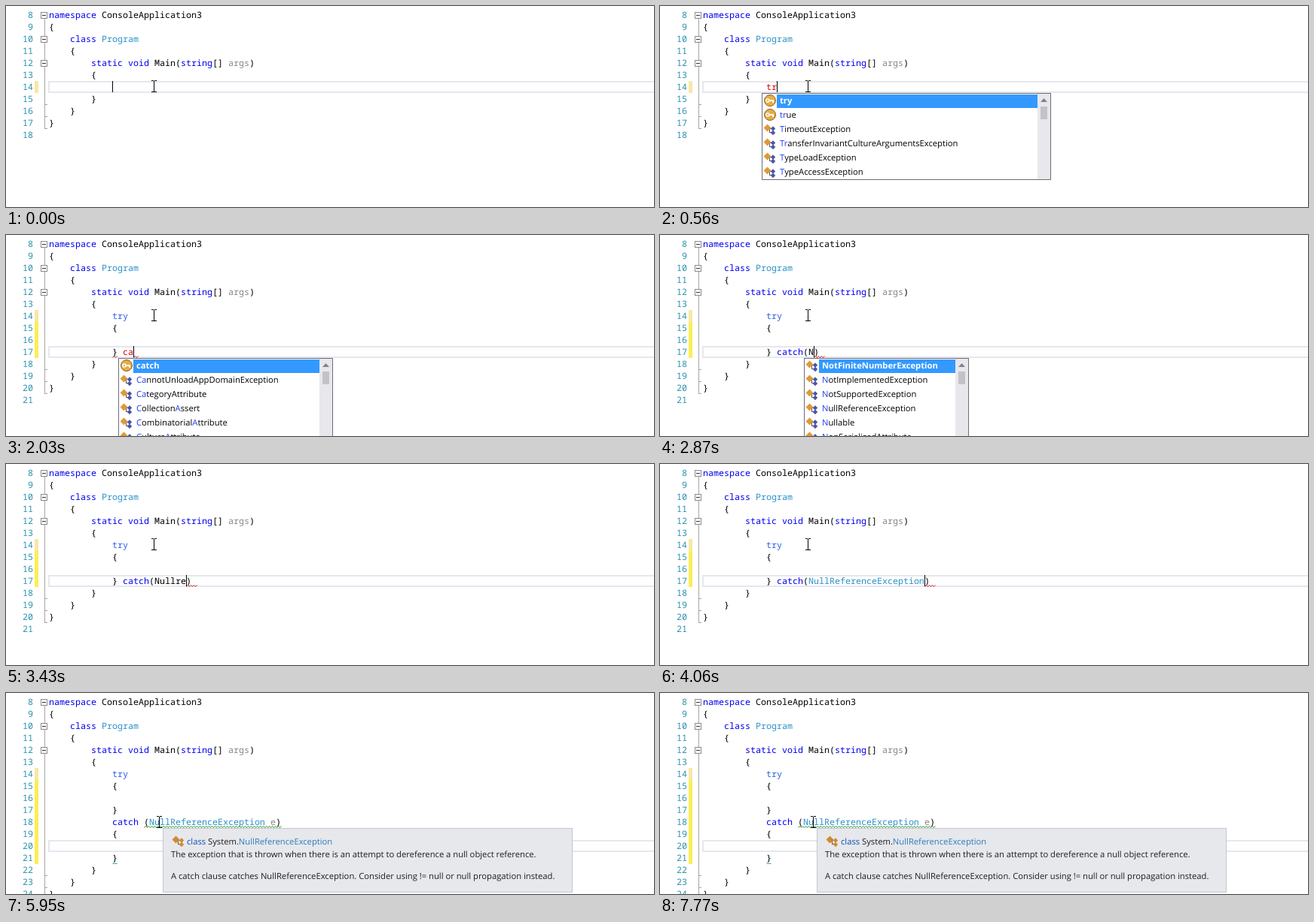
Animation of 860x268 px, one loop 8000 ms. Source, as an HTML page with a canvas:

```html
<!DOCTYPE html>
<html lang="en">
<head>
<meta charset="utf-8">
<title>Code editor</title>
<style>
  html, body { margin: 0; width: 100%; height: 100%; overflow: hidden; background: #fff; }
  canvas { display: block; }
</style>
</head>
<body>
<canvas id="stage" width="860" height="268"></canvas>
<script>
const ctx = document.getElementById('stage').getContext('2d');
const LOOP = 8000, LEFT = 57, CHAR = 7;
const CODE_FONT = '11.667px "Noto Sans Mono", monospace';
const UI_FONT = '11.23px "Open Sans", sans-serif';
const RED = '#d01818', GREEN = '#1f8a1f', TEAL = '#2b91af';

const wordColors = {};
const paintWords = (color, words) => words.split(' ').forEach(w => wordColors[w] = color);
paintWords('#0000f0', 'namespace class static void string catch');
paintWords('#2a5ee4', 'try');
paintWords('#2b91c8', 'Program NullReferenceException');
paintWords('#868686', 'args e');
paintWords('#e00000', 't tr c ca cat');

const head = [
  'namespace ConsoleApplication3', '{', '    class Program', '    {',
  '        static void Main(string[] args)', '        {'
];
const tail = ['        }', '    }', '}', ''];

const tryBlock = last => ['try', '{', '', last];
const fullBlock = [...tryBlock('}'), 'catch (NullReferenceException e)', '{', '', '}'];

const tryList = { col: 12, row: 6, width: 384, count: 6, items: [
  'try', 'true', 'TimeoutException', 'TransferInvariantCultureArgumentsException',
  'TypeLoadException', 'TypeAccessException'] };
const catchList = { col: 14, row: 9, width: 285, count: 9, items: [
  'catch', 'CannotUnloadAppDomainException', 'CategoryAttribute', 'CollectionAssert',
  'CombinatorialAttribute', 'CultureAttribute'] };
const nameList = { col: 20, row: 9, width: 219, count: 9, items: [
  'NotFiniteNumberException', 'NotImplementedException', 'NotSupportedException',
  'NullReferenceException', 'Nullable', 'NonSerializedAttribute'] };
const nullList = { ...nameList, width: 304, items: [
  'NullReferenceException', 'Nullable', 'NUnitSettings', 'NotSupportedException',
  'NonUniqueArgumentException', 'NumericAttribute'] };
const singleList = { ...nameList, width: 259, count: 1, items: ['NullReferenceException'] };

// marks: [first column, last column, row, color, straight]
const typeTry = text => ({ body: [text], col: 12 + text.length, on: 1 });
const typeCatch = (text, marks = [[12, 13, 9, RED], [12 + text.length, 13 + text.length, 9, RED]]) =>
  ({ body: tryBlock(text), col: 12 + text.length, on: 1, braces: 0, marks });
const typeName = name => ({
  body: tryBlock(`} catch(${name})`), col: 20 + name.length, on: 1,
  marks: [[20 + name.length, 22 + name.length, 9, RED]]
});

const steps = [
  [0, { body: [''], row: 6, col: 12, on: 1, marks: [], popup: null, braces: 0, tip: 0, mouse: [196, 107] }],
  [140, { on: 0 }],
  [350, typeTry('t')],
  [420, { popup: tryList }],
  [490, typeTry('tr')],
  [630, typeTry('try')],
  [700, { popup: null }],
  [840, { body: ['try { }'], col: 18, marks: [[18, 19, 6, '#b4aca4']] }],
  [1120, { on: 0 }],
  [1260, { body: tryBlock('}'), row: 8, col: 16, on: 1, marks: [] }],
  [1540, { row: 9, col: 13 }],
  [1610, { braces: 1 }],
  [1680, { body: tryBlock('} '), col: 14 }],
  [1820, typeCatch('} c')],
  [1890, { popup: catchList }],
  [1960, typeCatch('} ca')],
  [2240, typeCatch('} cat')],
  [2310, { ...typeCatch('} catch', []), popup: null }],
  [2380, typeName('')],
  [2520, { on: 0 }],
  [2730, typeName('N')],
  [2800, { popup: nameList }],
  [3010, { ...typeName('Nu'), popup: nullList }],
  [3080, typeName('Nul')],
  [3220, typeName('Null')],
  [3360, typeName('Nullr')],
  [3430, { ...typeName('Nullre'), popup: null }],
  [3500, typeName('Nullref')],
  [3570, { popup: singleList }],
  [3710, typeName('Nullrefe')],
  [3780, typeName('Nullrefer')],
  [3850, typeName('Nullrefere')],
  [3990, { ...typeName('NullReferenceException'), popup: null }],
  [4690, typeName('NullReferenceException ')],
  [4760, typeName('NullReferenceException e')],
  [4900, { body: tryBlock('} catch(NullReferenceException e) { }'), col: 48, marks: [] }],
  [4970, { body: fullBlock, row: 12, col: 16,
           marks: [[18, 44, 10, GREEN], [12, 13, 13, TEAL, true]] }],
  [5460, { mouse: [199, 134] }],
  [5530, { mouse: [201, 162] }],
  [5670, { mouse: [202, 168] }],
  [5740, { mouse: [203, 172] }],
  [5880, { on: 0, tip: 0.5 }],
  [5950, { tip: 1 }],
  [6370, { on: 1 }],
  [6860, { on: 0 }],
  [7350, { on: 1 }],
  [7770, { on: 0 }]
];

const colX = col => LEFT + CHAR * col;
const rowY = row => 12 + 16 * row;
const stateAt = time => Object.assign({}, ...steps.filter(s => s[0] <= time).map(s => s[1]));

function rect(x, y, w, h, color) {
  ctx.fillStyle = color;
  ctx.fillRect(x, y, w, h);
}

function frame(x, y, w, h, fill, border) {
  rect(x, y, w, h, border);
  rect(x + 1, y + 1, w - 2, h - 2, fill);
}

function polygon(points, color) {
  ctx.beginPath();
  points.forEach(p => ctx.lineTo(...p));
  ctx.fillStyle = color;
  ctx.fill();
}

const diamond = (x, y, r, color) =>
  polygon([[x, y - r], [x + r, y], [x, y + r], [x - r, y]], color);

// Draws [text, color] runs one after another.
function runs(x, y, parts, font = UI_FONT) {
  ctx.font = font;
  for (const [text, color] of parts) {
    ctx.fillStyle = color;
    ctx.fillText(text, x, y);
    x += ctx.measureText(text).width;
  }
}

function codeLine(text, row) {
  ctx.font = CODE_FONT;
  for (const token of text.matchAll(/\w+|[^\w\s]/g)) {
    ctx.fillStyle = wordColors[token[0]] || '#000';
    ctx.fillText(token[0], colX(token.index), rowY(row) + 4);
  }
}

function squiggle([from, to, row, color, straight]) {
  const y = rowY(row) + 6.5, end = colX(to) + 1;
  ctx.beginPath();
  for (let x = colX(from) + 0.5, i = 0; x <= end; x += 2, i++) {
    ctx.lineTo(x, straight ? y + 1 : y + (i % 2 ? -1 : 1));
  }
  ctx.strokeStyle = color;
  ctx.lineWidth = 1;
  ctx.stroke();
}

function gutter(lines, bodyLength) {
  rect(38, 100, 5, 16, '#f7e8a6');
  rect(38, 116, 5, 16 * (bodyLength - 1), '#fbee58');
  const firstEnd = head.length + bodyLength;
  rect(51, 17, 1, rowY(firstEnd + 2) + 7 - 17, '#a5a5a5');
  for (let i = 0; i < 3; i++) rect(51, rowY(firstEnd + i) + 7, 4, 1, '#a5a5a5');
  for (const row of [0, 2, 4]) {
    frame(46, rowY(row) - 4, 9, 9, '#fff', '#8a8a8a');
    rect(48, rowY(row), 5, 1, '#333');
  }
  ctx.font = CODE_FONT;
  ctx.fillStyle = TEAL;
  ctx.textAlign = 'right';
  lines.forEach((_, i) => ctx.fillText(i + 8, 36, rowY(i) + 4));
  ctx.textAlign = 'left';
}

function classIcon(x, y, main, small) {
  rect(x + 5, y + 5, 6, 1, '#555');
  rect(x + 7, y + 5, 1, 6, '#555');
  rect(x + 7, y + 10, 4, 1, '#555');
  diamond(x + 4.5, y + 4.5, 5, main);
  diamond(x + 12, y + 5.5, 3.2, small);
  diamond(x + 12, y + 11, 3.2, small);
}

function keyIcon(x, y) {
  ctx.beginPath();
  ctx.arc(x, y, 7.5, 0, 7);
  ctx.fillStyle = '#e5ad45';
  ctx.fill();
  ctx.strokeStyle = '#8d6420';
  ctx.lineWidth = 1;
  ctx.stroke();
  ctx.beginPath();
  ctx.arc(x - 3, y, 2, 0, 7);
  ctx.strokeStyle = '#fff';
  ctx.lineWidth = 1.6;
  ctx.stroke();
  rect(x - 1, y - 1, 6, 2, '#fff');
  rect(x + 3, y, 2, 3, '#fff');
}

function matchRuns(text, query) {
  const blue = '#1c3cf0', black = '#000', n = query.length;
  if (text.toLowerCase().startsWith(query)) return [[text.slice(0, n), blue], [text.slice(n), black]];
  const hump = n > 1 ? text.indexOf(query[1].toUpperCase(), 1) : -1;
  if (hump < 0) return [[text[0], blue], [text.slice(1), black]];
  return [[text[0], blue], [text.slice(1, hump), black], [text[hump], blue], [text.slice(hump + 1), black]];
}

function drawPopup({ col, row, width, count, items }, query) {
  const x = colX(col) - 6, y = rowY(row) + 8, height = count * 19 + 2;
  const bar = count > 1 ? 18 : 1;
  frame(x, y, width, height, '#fff', '#6d6d78');
  rect(x + 20, y + 2, width - 20 - bar, 18, '#3399ff');
  items.forEach((text, i) => {
    const top = y + 19 * i;
    if (/^[a-z]/.test(text)) keyIcon(x + 11, top + 10);
    else classIcon(x + 3, top + 4, '#dd9a3a', '#4a55a8');
    if (i === 0) runs(x + 24, top + 14, [[text, '#fff']], 'bold ' + UI_FONT);
    else runs(x + 24, top + 14, matchRuns(text, query));
  });
  if (count > 1) {
    const barX = x + width - 18;
    rect(barX, y + 1, 17, height - 2, '#e8e8ec');
    polygon([[barX + 4, y + 12], [barX + 8.5, y + 7], [barX + 13, y + 12]], '#80838f');
    rect(barX + 4, y + 18, 9, 17, '#c2c3c9');
  }
}

function drawTip(alpha) {
  ctx.globalAlpha = alpha;
  frame(208, 180, 544, 86, '#e7e8ec', '#c4c6d2');
  classIcon(221, 191, '#d08a30', '#d08a30');
  runs(240, 202, [['class ', '#0b4fb3'], ['System.', '#1e1e1e'], ['NullReferenceException', '#2a7dbb']]);
  runs(219, 219, [['The exception that is thrown when there is an attempt to dereference a null object reference.', '#1e1e1e']]);
  runs(219, 248, [['A catch clause catches NullReferenceException. Consider using != null or null propagation instead.', '#1e1e1e']]);
  ctx.globalAlpha = 1;
}

function drawMouse([x, y]) {
  rect(x, y - 7, 1, 15, '#000');
  for (const edge of [y - 8, y + 7]) {
    rect(x - 3, edge, 3, 1, '#000');
    rect(x + 1, edge, 3, 1, '#000');
  }
}

function draw(state) {
  const { body, row, col, popup } = state;
  const lines = [...head, ...body.map(text => text && ' '.repeat(12) + text), ...tail];
  rect(0, 0, 860, 268, '#fff');
  gutter(lines, body.length);

  ctx.strokeStyle = '#e6e6f0';
  ctx.lineWidth = 2;
  ctx.strokeRect(57, rowY(row) - 7, 820, 14);
  if (state.braces) for (const r of [7, 9]) rect(colX(12), rowY(r) - 8, 7, 15, '#dbe0cc');

  lines.forEach(codeLine);
  state.marks.forEach(squiggle);
  if (state.on) rect(colX(col), rowY(row) - 8, 1, 15, '#000');
  if (popup) drawPopup(popup, lines[row].slice(popup.col, col).toLowerCase());
  if (state.tip) drawTip(state.tip);
  drawMouse(state.mouse);
}

ctx.textRendering = 'geometricPrecision';
const start = performance.now();
function tick() {
  draw(stateAt((performance.now() - start) % LOOP));
  requestAnimationFrame(tick);
}
tick();
</script>
</body>
</html>
```
